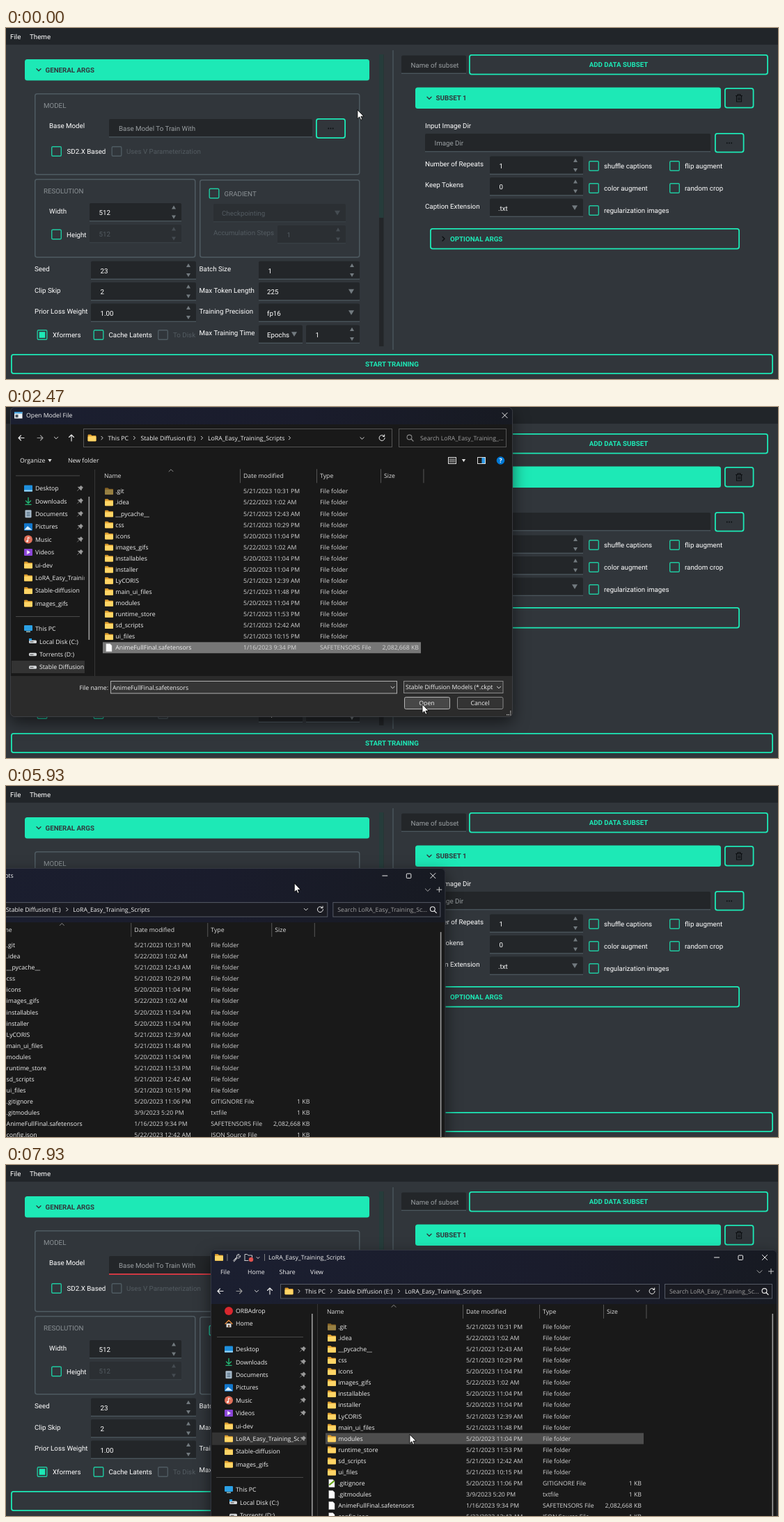
Write an HTML page that moves like this. It is 1109 by 505 pixels and loops after 8000 ms.

```html
<!DOCTYPE html>
<html lang="en">
<head>
<meta charset="utf-8">
<title>Training setup</title>
<style>
html, body { margin: 0; width: 100%; height: 100%; overflow: hidden; background: #31363b; }
svg { display: block; width: 100%; height: 100%; }
text { white-space: pre; text-rendering: geometricPrecision; }
.app { font: 9.75px Roboto, sans-serif; fill: #fff; }
.win { font: 8.72px "Open Sans", sans-serif; fill: #f2f2f2; }
.b { font-weight: 700; }
.mid { text-anchor: middle; }
.end { text-anchor: end; }
.shadow { filter: drop-shadow(0 8px 11px rgba(0, 0, 0, .55)); }
#beam { mix-blend-mode: difference; }
</style>
</head>
<body>
<svg id="stage" viewBox="0 0 1109 505" preserveAspectRatio="none"></svg>
<script>
const TEAL = '#1de9b6', BG = '#31363b', DARK = '#232629', EDGE = '#4f5b62', HINT = '#9a9fa2', OFF = '#535b61';
const PITCH = 16.07, LOOP = 8000, STEP = 200 / 3;

// ---- drawing helpers
const rect = (x, y, w, h, fill, more = '') => `<rect x="${x}" y="${y}" width="${w}" height="${h}" fill="${fill}" ${more}/>`;
const frame = (x, y, w, h, color, width = 1, r = 2, fill = 'none') =>
  rect(x + width / 2, y + width / 2, w - width, h - width, fill, `stroke="${color}" stroke-width="${width}" rx="${r}"`);
const path = (d, stroke, width = 1, fill = 'none') =>
  `<path d="${d}" fill="${fill}" stroke="${stroke}" stroke-width="${width}" stroke-linecap="round" stroke-linejoin="round"/>`;
const dot = (x, y, r, fill) => `<circle cx="${x}" cy="${y}" r="${r}" fill="${fill}"/>`;
const text = (x, y, s, fill = '', cls = '', drop = 3.5) =>
  `<text x="${x}" y="${y + drop}" ${fill && `fill="${fill}"`} class="${cls}">${s}</text>`;
const small = (x, y, s, fill, cls) => text(x, y, s, fill, cls, 3.1);
const group = (id, body, more = '') => `<g id="${id}" ${more}>${body}</g>`;
const clip = (id, x, y, w, h, r = 0) => `<clipPath id="${id}">${rect(x, y, w, h, '#000', `rx="${r}"`)}</clipPath>`;
const chevron = (x, y, dir, color = '#ddd', s = 2.6, w = 1) => {
  const d = { down: `M${x - s} ${y - s / 2}l${s} ${s} ${s} ${-s}`, up: `M${x - s} ${y + s / 2}l${s} ${-s} ${s} ${s}`,
    right: `M${x - s / 2} ${y - s}l${s} ${s} ${-s} ${s}` };
  return path(d[dir], color, w);
};

// ---- main window
const tri = (x, y, s, color) => `<path d="M${x - Math.abs(s)} ${y - s * .8}h${2 * Math.abs(s)}l${-Math.abs(s)} ${s * 1.7}z" fill="${color}"/>`;
const field = (x1, x2, cy, s, kind, state) => {
  const off = state === 'off', arrow = off ? '#454c52' : '#727a7f';
  let out = rect(x1, cy - 13, x2 - x1, 26, off ? '#2b2f33' : DARK, 'rx="2"');
  out += rect(x1, cy + 12.2, x2 - x1, 1.2, off ? '#3b4248' : EDGE);
  out += text(x1 + (kind === 'combo' ? 12 : 13.5), cy + .5, s, off ? OFF : state === 'hint' ? HINT : '#fff');
  if (kind === 'spin') out += tri(x2 - 11, cy - 7, -3, arrow) + tri(x2 - 11, cy + 7, 3, arrow);
  if (kind === 'combo') out += tri(x2 - 12, cy, 4, arrow);
  return out;
};
const check = (x, cy, s, tx, state) => {
  const off = state === 'off';
  return frame(x, cy - 7.5, 15, 15, off ? EDGE : '#1fc9a0', 1.4, 1.5) +
    (state === 'on' ? rect(x + 3.2, cy - 4.3, 8.6, 8.6, TEAL) : '') + text(tx, cy + .3, s, off ? OFF : '#fff');
};
const button = (x, y, w, h, s = '') => frame(x, y, w, h, TEAL, 1.8, 3) + text(x + w / 2, y + h / 2, s, TEAL, 'b mid');
const bar = (x, y, w, h, s) => rect(x, y, w, h, TEAL, 'rx="3.5"') +
  chevron(x + 20, y + h / 2, 'down', BG, 3, 1.4) + text(x + 29.5, y + h / 2, s, BG, 'b');
const more = (x, y) => [-3.2, 0, 3.2].map(d => dot(x + d, y, .9, '#0b0e10')).join('');
const box = (x, y, w, h, s = '') => frame(x, y, w, h, EDGE, 1.5, 3) + text(x + 13, y + 17.5, s, '#8b9195');
const labels = (x, list) => list.map(([y, s, c]) => text(x, y, s, c)).join('');

const app = [
  rect(0, 0, 1109, 505, BG), rect(0, 0, 1109, 24, '#212529'),
  text(6, 12, 'File'), text(34, 12, 'Theme'),
  rect(555.4, 32, 1.2, 431, EDGE), rect(536, 38, 6.5, 420, DARK), rect(536, 38, 6.5, 235, '#263c3b'),
  bar(27, 45, 495, 30.5, 'GENERAL ARGS'),
  box(41, 94, 467.5, 117.5, 'MODEL'), text(62, 140.5, 'Base Model'),
  field(148, 440, 144, '', '', ''), button(445, 130, 43, 29), more(466.5, 144.5),
  check(65, 177.5, 'SD2.X Based', 87.5), check(151.5, 177.5, 'Uses V Parameterization', 173, 'off'),
  box(41, 217, 231.5, 113.5, 'RESOLUTION'), text(62, 263, 'Width'),
  field(120, 252, 265, '512', 'spin'), check(65, 297, 'Height', 87), field(120, 252, 296, '512', 'spin', 'off'),
  box(278, 218, 230.5, 112.5), check(291.5, 238, '', 0), text(313.5, 238.5, 'GRADIENT', '#8b9195'),
  field(298, 488, 266, 'Checkpointing', 'combo', 'off'),
  text(298, 294.5, 'Accumulation Steps', OFF), field(390, 488, 297, '1', 'spin', 'off'),
  labels(41, [[346, 'Seed'], [377, 'Clip Skip'], [407.5, 'Prior Loss Weight']]),
  labels(277.5, [[346, 'Batch Size'], [377, 'Max Token Length'], [407.5, 'Training Precision'], [438, 'Max Training Time']]),
  field(122, 273, 348.5, '23', 'spin'), field(122, 273, 379, '2', 'spin'), field(122, 273, 409.5, '1.00', 'spin'),
  field(363, 508, 348.5, '1', 'spin'), field(363, 508, 379, '225', 'combo'), field(363, 508, 409.5, 'fp16', 'combo'),
  field(363, 426, 440.5, 'Epochs', 'combo'), field(431, 508, 440.5, '1', 'spin'),
  check(44.5, 441.5, 'Xformers', 67, 'on'), check(125.5, 441.5, 'Cache Latents', 147.5), check(218, 441.5, 'To Disk', 240, 'off'),
  field(568, 661, 52.5, 'Name of subset', '', 'hint'), button(665, 38, 430, 29.5, 'ADD DATA SUBSET'),
  bar(588, 85.5, 439, 30.5, 'SUBSET 1'), button(1032, 86, 42.5, 29.5),
  path('M1048.5 97.5h9M1051 97.2v-1.7h4v1.7M1049.5 97.5v8.5h7v-8.5M1052 100v3.5M1054.2 100v3.5', '#0b0e10', 1.1),
  text(602, 140.5, 'Input Image Dir'), field(602, 1012, 165, 'Image Dir', '', 'hint'), button(1018, 151, 42.5, 28.5), more(1039, 165.5),
  labels(602, [[195, 'Number of Repeats'], [225.5, 'Keep Tokens'], [256, 'Caption Extension']]),
  field(695, 829, 197.5, '1', 'spin'), field(695, 829, 228, '0', 'spin'), field(695, 829, 258.5, '.txt', 'combo'),
  check(837, 198.5, 'shuffle captions', 859), check(953, 198.5, 'flip augment', 975),
  check(837, 230.5, 'color augment', 859), check(953, 230.5, 'random crop', 975), check(837, 262.5, 'regularization images', 859),
  button(609, 288, 445, 30.5), chevron(628.5, 303.3, 'right', '#0b0e10', 3, 1.3), text(638, 303.3, 'OPTIONAL ARGS', TEAL, 'b'),
  button(7, 469, 1095, 29, 'START TRAINING'),
  group('hint', text(162, 144.5, 'Base Model To Train With', HINT)),
  group('model', rect(162, 138, 0, 13.5, '#17a587', 'id="marked"') +
    text(162, 144.5, 'E:/LoRA_Easy_Training_Scripts/AnimeFullFinal.safetensors')),
  rect(162, 138, 1, 12.5, '#fff', 'id="caret"'), rect(148, 156.3, 292, 1.7, TEAL, 'id="focus"')
].join('');

// ---- file windows
const folder = (x, y) => path(`M${x + .5} ${y + 4}v-8.5h4l1.5 1.5h5.5v7z`, '#e0a030', .8, '#e0a030') +
  rect(x, y - 2.2, 12, 7, '#ffd566', 'rx=".8"');
const page = (x, y) => path(`M${x + 2} ${y - 5.5}h5.5l2.5 2.5v8.5h-8z`, '#cfcfcf', .5, '#fafafa');
const drive = (x, y) => rect(x, y - 2, 11, 4.5, '#d5d8da', 'rx="1.5"') + rect(x + 1.5, y, 5, 1, '#444');
const sideIcons = {
  Desktop: (x, y) => rect(x, y - 4.5, 12, 9, '#1f8fdc', 'rx="1"') + rect(x, y + 2.5, 12, 2, '#9fdcff'),
  Downloads: (x, y) => path(`M${x + 6} ${y - 5}v7.5m-3.5-3l3.5 3.5 3.5-3.5M${x + 2} ${y + 5}h8`, '#22b573', 1.4),
  Documents: (x, y) => rect(x + 1.5, y - 5.5, 9, 11, '#a9bccb', 'rx="1"') + path(`M${x + 4} ${y - 2}h4m-4 2.3h4m-4 2.3h4`, '#3b5870'),
  Pictures: (x, y) => rect(x, y - 5, 12, 10.5, '#1277cc', 'rx="1"') + path(`M${x + 1} ${y + 4}l4-4.5 5.5 4.5z`, '#d8f0ff', .6, '#d8f0ff'),
  Music: (x, y) => dot(x + 6, y, 6, '#e0705a') + path(`M${x + 5.5} ${y + 2.5}v-5.5l2.5 1`, '#fff') + dot(x + 4.5, y + 2.5, 1.4, '#fff'),
  Videos: (x, y) => rect(x, y - 5, 12, 10, '#8a45d8', 'rx="1"') + path(`M${x + 4.5} ${y - 2.5}l4 2.5-4 2.5z`, '#fff', .5, '#fff'),
  'This PC': (x, y) => rect(x, y - 5, 12, 8, '#2ba0e4', 'rx="1"') + rect(x + 3, y + 3.5, 6, 1.6, '#9bb')
};
const pin = (x, y) => path(`M${x - 3.5} ${y + 3.5}l3-3m-2-2l4.5 4.5 .8-2.3 1.7-1.7-2.8-2.8-1.7 1.7z`, '#9a9a9a', .7, '#9a9a9a');
const places = ['Desktop', 'Downloads', 'Documents', 'Pictures', 'Music', 'Videos', 'ui-dev', 'LoRA_Easy_Training_Scripts', 'Stable-diffusion', 'images_gifs'];
const sidebar = (x, y0, pinX, clipId, lineEnd) => {
  const rows = places.map((s, i) => (sideIcons[s] || folder)(x, y0 + 18.4 * i) + small(x + 16, y0 + 18.4 * i, s));
  const drives = ['Local Disk (C:)', 'Torrents (D:)', 'Stable Diffusion (E:)'].map((s, i) =>
    drive(x + 7, y0 + 220.4 + 18.4 * i) + small(x + 22, y0 + 220.4 + 18.4 * i, s));
  return `<g clip-path="url(#${clipId})">${rows.join('')}${drives.join('')}</g>` +
    sideIcons['This PC'](x, y0 + 202) + small(x + 16, y0 + 202, 'This PC') +
    rect(x - 12, y0 + 184, lineEnd - x + 12, .8, '#555') +
    rect(x + 7, y0 + 216, 4, 3, '#2ba0e4') + [0, 1, 2, 3, 4, 5].map(i => pin(pinX, y0 + 18.4 * i)).join('');
};

const folders = `.git|21/2023 10:31 PM
.idea|22/2023 1:02 AM
__pycache__|21/2023 12:43 AM
css|21/2023 10:29 PM
icons|20/2023 11:04 PM
images_gifs|22/2023 1:02 AM
installables|20/2023 11:04 PM
installer|20/2023 11:04 PM
LyCORIS|21/2023 12:39 AM
main_ui_files|21/2023 11:48 PM
modules|20/2023 11:04 PM
runtime_store|21/2023 11:53 PM
sd_scripts|21/2023 12:42 AM
ui_files|21/2023 10:15 PM`.split('\n').map(s => s.replace('|', '|5/') + '|File folder');
const weights = 'AnimeFullFinal.safetensors|1/16/2023 9:34 PM|SAFETENSORS File|2,082,668 KB';
const extras = ['.gitignore|5/20/2023 11:06 PM|GITIGNORE File|1 KB', '.gitmodules|3/9/2023 5:20 PM|txtfile|1 KB', weights,
  'config.json|5/22/2023 12:42 AM|JSON Source File|1 KB', 'install.bat|5/20/2023 11:04 PM|Batch File|1 KB', 'main.py|5/21/2023 11:48 PM|PY File|2 KB'];

const fileList = (dx, y0, list) => {
  const head = [[141, 'Name'], [341, 'Date modified'], [451, 'Type'], [543, 'Size']].map(([x, s]) => small(x + dx, y0 - 22.3, s, '#dedede'));
  const lines = [336, 446, 538, 599.5].map(x => rect(x + dx, y0 - 32, .9, 20, '#5d5d5d'));
  const rows = list.map((row, i) => {
    const [name, date, type, size = ''] = row.split('|'), y = y0 + PITCH * i, x = 142 + dx;
    const icon = type === 'File folder' ? folder(x, y) : page(x, y);
    return `<g opacity="${name === '.git' ? .55 : 1}">${icon}</g>` +
      (name === '.gitignore' ? path(`M${x + 3} ${y + 2}l6-5`, '#6aa818', 2) : '') +
      small(157.3 + dx, y, name) + small(341 + dx, y, date, '#d6d6d6') + small(451 + dx, y, type, '#d6d6d6') + small(593 + dx, y, size, '#d6d6d6', 'end');
  });
  return [...head, ...lines, chevron(237 + dx, y0 - 30, 'up', '#aaa', 3, .8), ...rows].join('');
};
const nav = (xs, y) => path(`M${xs[0] + 4} ${y}h-8m3.5-3.5l-3.5 3.5 3.5 3.5M${xs[3]} ${y + 4.5}v-9m-3.5 3.5l3.5-3.5 3.5 3.5`, '#eee', 1.1) +
  path(`M${xs[1] - 4} ${y}h8m-3.5-3.5l3.5 3.5-3.5 3.5`, '#9a9a9a', 1.1) + chevron(xs[2], y, 'down');
const address = (x, y) => folder(x, y) + [20.5, 67, 164].map(d => chevron(x + d, y, 'right', '#ddd', 2.3)).join('') +
  small(x + 29, y, 'This PC') + small(x + 76, y, 'Stable Diffusion (E:)') + small(x + 172.5, y, 'LoRA_Easy_Training_Scripts');
const refresh = (x, y) => path(`M${x + 3.3} ${y - 2.4}a4 4 0 1 0 .8 2.4M${x + 3.7} ${y - 4.6}v2.5h-2.5`, '#eee');
const lens = (x, y, c) => path(`M${x + 2} ${y + 2}l3 3`, c, 1.2) + `<circle cx="${x - .5}" cy="${y - .5}" r="3.4" fill="none" stroke="${c}" stroke-width="1.1"/>`;
const cross = (x, y) => path(`M${x - 3.6} ${y - 3.6}l7.2 7.2m0-7.2l-7.2 7.2`, '#eee');
const hot = id => rect(0, 0, 457, 16, '#4d4d4d', `id="${id}"`);

const dialog = [
  rect(6, 0, 722, 446, '#191919', 'rx="6" class="shadow"'),
  `<g clip-path="url(#dlgClip)">`, rect(6, 0, 722, 25, 'url(#navy)'), rect(6, 387, 722, 60, '#2b2b2b'), '</g>',
  frame(6, 0, 722, 446, '#45474d', .8, 6),
  rect(12, 7, 11.5, 9.5, '#e9eef2'), rect(12, 7, 11.5, 2.5, '#4aa3dd'), rect(13.5, 11, 4, 4, '#4a5560'),
  small(29, 12, 'Open Model File'), cross(716.5, 12),
  nav([22, 49, 72, 94], 44.5), frame(111, 31, 444, 27, '#555', 1, 0), address(117.5, 44.5), chevron(407.5, 44.5, 'right', '#ddd', 2.3),
  chevron(511.5, 45, 'down'), refresh(540, 44.5), frame(564, 31, 155, 27, '#555', 1, 0), lens(580, 44, '#888'),
  small(595, 44.5, 'Search LoRA_Easy_Training_...', '#a0a0a0'),
  small(20, 77, 'Organize'), tri(63, 77, 2.6, '#ddd'), small(89, 77, 'New folder'),
  frame(635, 72, 12, 10, '#ddd', 1, 0), path('M637 75h8m-8 2h8m-8 2h8', '#ddd', .8), tri(657.5, 77, 2.6, '#ddd'),
  frame(677, 72, 12, 10, '#ddd', 1, 0), rect(683.5, 73, 4.5, 8, '#2f9be8'), dot(710.5, 77, 5.8, '#0078d4'), small(710.5, 77, '?', '#fff', 'b mid'),
  rect(14, 98.5, 92, .8, '#555'), rect(8, 365, 105, 18, '#333'), sidebar(26, 117, 106, 'dlgSide', 106),
  rect(118.5, 129, 1.6, 206, '#9c9c9c'), rect(127, 90, .9, 297, '#3a3a3a'),
  hot('dlgHot'), hot('dlgPick'), fileList(0, 121.3, [...folders, weights]),
  small(147, 403.5, 'File name:', '', 'end'), frame(150, 394, 412, 18.5, '#b0b0b0', 1, 0, '#353535'), chevron(555.5, 403.5, 'down'),
  rect(153, 397.5, .9, 11.5, '#fff', 'id="nameCaret"'), group('fileName', small(153, 403.5, 'AnimeFullFinal.safetensors')),
  frame(571, 394, 143.5, 18, '#8a8a8a', 1, 0, '#353535'), small(574, 403, 'Stable Diffusion Models (*.ckpt'), chevron(708, 403.5, 'down'),
  rect(572.5, 417.5, 65, 17, '#333', 'id="open" rx="2" stroke="#b5b5b5"'), small(604.5, 426, 'Open', '', 'mid'),
  frame(648, 417, 66.5, 18, '#8a8a8a', 1, 2, '#333'), small(681, 426, 'Cancel', '', 'mid'),
  [[724, 442], [721.5, 442], [724, 439.5], [719, 442], [724, 437]].map(([x, y]) => rect(x, y, 1.5, 1.5, '#aaa')).join('')
].join('');

const explorer = [
  rect(0, 0, 814, 470, '#191919', 'rx="6" class="shadow"'),
  `<g clip-path="url(#expClip)">${rect(0, 0, 814, 78, 'url(#navy)')}</g>`, frame(0, 0, 814, 470, '#3d404a', .8, 6),
  folder(6, 11), rect(23.5, 6, .9, 10, '#888'), rect(77, 6, .9, 10, '#888'),
  path('M32.5 15.5l5-5m0 0a3 3 0 0 1 3.5-4l-1.7 2 1.3 1.3 2-1.5a3 3 0 0 1-4 3.5l-5 5z', '#ddd', .9),
  path('M49 15.5v-9h3.5l1.5 1.5h5.5v3', '#ddd', .9), path('M49 15.5h5', '#ddd', .9), dot(58, 14, 3.2, '#e0524f'),
  chevron(68, 11.5, 'down', '#ddd', 2), small(83, 11, 'LoRA_Easy_Training_Scripts'),
  path('M723.5 11h7', '#eee'), frame(757.5, 7.5, 7.5, 7.5, '#eee', 1, 1), cross(796, 11),
  [[14, 'File'], [53, 'Home'], [98.5, 'Share'], [143, 'View']].map(([x, s]) => small(x, 32, s)).join(''),
  chevron(788.5, 31.5, 'down', '#aaa', 3.5), path('M801.5 31h7m-3.5-3.5v7', '#ccc'),
  nav([14, 41, 66, 85], 59.5), frame(100, 49, 545, 21.5, '#555a66', 1, 0, '#1a1b22'), address(106.5, 59.5), chevron(613.5, 59.5, 'down'), refresh(634, 59.5),
  frame(652, 49, 155, 21.5, '#555a66', 1, 0, '#1a1b22'), small(659, 59.5, 'Search LoRA_Easy_Training_Sc...', '#a0a0a0'), lens(796, 59.5, '#eee'),
  dot(26, 88, 6, '#d9272e'), small(36, 88, 'ORBAdrop'),
  path('M21 106.5l5-5 5 5', '#e58a3a', 1.3), rect(22.5, 106, 7, 5.5, '#d8d8d8'), rect(25, 108, 2.2, 3.5, '#7a5a40'), small(36, 106, 'Home'),
  rect(9, 125, 124, .8, '#555'), rect(2, 262.8, 136, 18, '#333'), sidebar(20, 143, 132, 'expSide', 133), pin(132, 271.8),
  rect(145, 92, 1.6, 378, '#9c9c9c'), rect(153, 78, .9, 392, '#3a3a3a'), rect(806.5, 92, 1.6, 378, '#9c9c9c'),
  hot('expHot'), fileList(26, 110.9, [...folders, ...extras])
].join('');

document.getElementById('stage').innerHTML = `<defs>
  <linearGradient id="navy"><stop offset="0" stop-color="#1b1f30"/><stop offset=".6" stop-color="#1a1c2c"/><stop offset="1" stop-color="#171a22"/></linearGradient>
  ${clip('dlgClip', 6, 0, 722, 446, 6)}${clip('expClip', 0, 0, 814, 470, 6)}${clip('dlgSide', 6, 90, 106.5, 296)}${clip('expSide', 0, 80, 127, 390)}</defs>
  <g class="app">${app}</g>${group('dialog', dialog, 'class="win"')}${group('explorer', explorer, 'class="win"')}
  ${group('arrow', path('M0 0V12.5L2.9 9.8 4.8 14.2 6.8 13.3 4.9 9.1H8.8Z', '#000', .8, '#fff'))}
  ${group('beam', path('M-2.5 -6.5h2l.5 .5 .5 -.5h2M0 -6v12M-2.5 6.5h2l.5 -.5 .5 .5h2', '#fff'))}`;

// ---- motion tables: time, then values
const pointer = [[0, 505, 118], [133, 482, 134], [333, 461, 144], [600, 461, 144], [1000, 462, 152], [1400, 440, 342], [1733, 430, 345],
  [2267, 582, 419], [2467, 598, 428], [2667, 594, 422], [3133, 412, 192], [3467, 367, 146], [4400, 367, 146], [4467, 266, 127]];
const leave = [[7667, 872, 144], [7933, 580, 388]];
const drag = [[5733, -640, 70, 19], [5800, -480, 88, 19], [5867, -325, 105, 19], [5933, -184, 118, 19], [6000, -78, 128, 15], [6200, 120, 148, 8],
  [6400, 244, 160, 0], [6533, 272, 154, 0], [6600, 262, 150, 0], [7000, 262, 150, 0], [7133, 268, 122, 0], [7200, 278, 113, 0], [7333, 294, 122, 0]];
const popup = [[800, .9, 0], [867, .92, .35], [933, .96, .8], [1000, .98, 1], [1067, .993, 1], [1133, 1, 1], [2600, 1, 1], [2667, .98, .7], [2733, .94, .25], [2800, .92, 0]];

const at = (table, t) => {
  const i = table.findIndex(k => k[0] > t);
  if (i < 0) return table[table.length - 1].slice(1);
  if (!i) return table[0].slice(1);
  const a = table[i - 1], b = table[i], f = (t - a[0]) / (b[0] - a[0]);
  return a.slice(1).map((v, n) => v + (b[n + 1] - v) * f);
};
const el = id => document.getElementById(id);
const show = (id, on) => el(id).style.display = on ? '' : 'none';
const set = (id, attrs) => { for (const k in attrs) el(id).setAttribute(k, attrs[k]); };
const place = (id, x, y) => set(id, { transform: `translate(${x} ${y})` });
const highlight = (id, on, x, y0, row, count) => {
  show(id, on && row >= 0 && row < count);
  set(id, { x, y: y0 - 8 + PITCH * row });
};
const rowAt = (y, y0) => Math.floor((y - y0 + 8) / PITCH);

function draw(now) {
  const t = Math.floor((now + 3.4) / STEP) * STEP + .5;
  const [scale, alpha] = at(popup, t), [wx, wy, lead] = at(drag, t);
  const dragging = t >= 5733;
  let [x, y] = dragging ? [wx + 578 + lead, wy + 22] : at(pointer, t);
  if (t > 7667) [x, y] = at(leave, t);

  // base model field
  const filled = t >= 2800 && t < 4333, marked = t >= 3667 && filled;
  show('hint', !filled);
  show('model', filled);
  show('focus', t >= 3667);
  set('focus', { fill: t < 4333 ? TEAL : '#e5353f' });
  set('marked', { width: marked ? pathWidth : 0 });
  show('caret', t >= 4333 && t < 5533);

  // open dialog
  const picked = t >= 1733;
  show('dialog', alpha > 0);
  set('dialog', { opacity: alpha, transform: `translate(367 222) scale(${scale}) translate(-367 -222)` });
  highlight('dlgHot', alpha > .9 && x < 596, 139, 121.3, rowAt(222 + (y - 222) / scale, 121.3), 15);
  highlight('dlgPick', picked, 139, 121.3, 14, 15);
  set('dlgPick', { fill: '#777' });
  show('fileName', picked);
  show('nameCaret', !picked);
  set('open', { fill: t >= 2333 ? '#474747' : '#333' });

  // explorer
  show('explorer', dragging);
  place('explorer', wx, wy);
  highlight('expHot', t > 7667 && x - wx > 165 && x - wx < 622, 165, 110.9, rowAt(y - wy, 110.9), 20);

  const overField = t >= 3333 && t < 4467;
  show('beam', overField);
  show('arrow', !overField && (t < 4533 || dragging));
  place('beam', x, y);
  place('arrow', x, y);
}

const pathWidth = el('model').querySelector('text').getComputedTextLength();
const start = performance.now();
const tick = () => {
  draw((performance.now() - start) % LOOP);
  requestAnimationFrame(tick);
};
tick();
</script>
</body>
</html>
```
